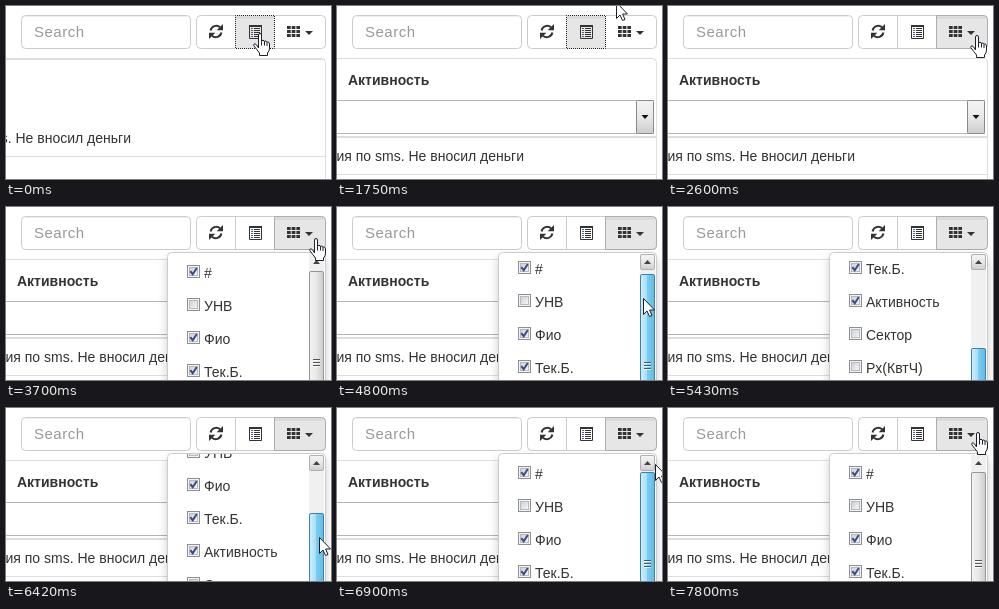
An HTML page for the animation above (8 s loop, 325 by 173 pixels).

```html
<!DOCTYPE html>
<html lang="ru">
<head>
<meta charset="utf-8">
<title>Column picker</title>
<style>
html, body { margin: 0; width: 100%; height: 100%; overflow: hidden; background: #fff; }
svg { display: block; width: 325px; height: 173px; }
text { font: 14px "Liberation Sans", Arial, sans-serif; fill: #333; white-space: pre; }
.hint { font-size: 15px; letter-spacing: .5px; fill: #999; }
.bold { font-weight: bold; }
.end { text-anchor: end; }
.box { fill: #fff; stroke: #ccc; }
.line { fill: none; stroke: #ddd; }
.ink { fill: #333; }
.on { fill: #e6e6e6; stroke: #adadad; }
.menu { filter: drop-shadow(0 5px 5px rgba(0, 0, 0, .2)); }
.cursor { fill: #fff; stroke: #1c1f2a; stroke-linejoin: round; }
</style>
</head>
<body>
<svg viewBox="0 0 325 173">
  <defs>
    <linearGradient id="grey"><stop stop-color="#f4f4f4"/><stop offset=".5" stop-color="#e6e6e6"/><stop offset="1" stop-color="#cbcbcb"/></linearGradient>
    <linearGradient id="blue"><stop stop-color="#d3effc"/><stop offset=".45" stop-color="#a6def6"/><stop offset=".5" stop-color="#79cdf0"/><stop offset="1" stop-color="#62bce6"/></linearGradient>
    <linearGradient id="knob" x2="0" y2="1"><stop stop-color="#f4f4f4"/><stop offset=".5" stop-color="#e8e8e8"/><stop offset="1" stop-color="#cdcdcd"/></linearGradient>
    <linearGradient id="tick" x2="1" y2="1"><stop stop-color="#cbcfd5"/><stop offset="1" stop-color="#f7f7f7"/></linearGradient>
    <clipPath id="list"><path d="M162 46h157v140h-157z"/></clipPath>
  </defs>

  <rect class="box" x="15.5" y="9.5" width="169" height="33" rx="4"/>
  <path d="M18 10.5h164" stroke="#eee"/>
  <text class="hint" x="28" y="31">Search</text>

  <rect class="line" x="-9.5" y="52.5" width="329" height="200" rx="4"/>
  <g id="card">
    <path class="line" d="M0 53.5h319M0 150.5h319"/>
    <text class="end" x="125" y="137">sms. Не вносил деньги</text>
  </g>
  <g id="table">
    <text class="bold" x="11" y="79">Активность</text>
    <path d="M0 94.5H316.5V127.5H0" fill="none" stroke="#b4b4b4"/>
    <rect x="299.5" y="94.5" width="17" height="33" rx="1" fill="url(#knob)" stroke="#8a8a8a"/>
    <path d="M304.5 109h7l-3.5 4z" fill="#111"/>
    <path class="line" d="M0 131h319" stroke-width="2"/>
    <path class="line" d="M0 168.5h319"/>
    <text class="end" x="187" y="155">ия по sms. Не вносил деньги</text>
  </g>

  <rect class="box" x="190.5" y="9.5" width="129" height="33" rx="4"/>
  <path d="M229.5 10v32M268.5 10v32" stroke="#ccc"/>
  <g id="view">
    <path d="M229 9h40v34h-40z" fill="#e6e6e6"/>
    <path d="M230 11.5h38" stroke="#d6d6d6" stroke-width="2"/>
    <path d="M229.5 9.5h39v33h-39z" fill="none" stroke="#222" stroke-dasharray="1" stroke-dashoffset=".5"/>
  </g>
  <path id="hover" class="on" d="M268.5 9.5h47q4 0 4 4v25q0 4-4 4h-47z"/>
  <path id="inset" d="M269 11.5h48" stroke="#d6d6d6" stroke-width="2"/>

  <path d="M204.6 24.5A5.7 5.7 0 0 1 214 21.3M215.4 26.5A5.7 5.7 0 0 1 206 29.7" fill="none" stroke="#333" stroke-width="2"/>
  <path class="ink" d="M217 18v6.3h-6.3zM203 33v-6.3h6.3z"/>
  <path d="M243.5 19.5h12v13h-12z" fill="none" stroke="#333"/>
  <path d="M243 20h13" stroke="#333" stroke-width="2"/>
  <path d="M245 22.5h2M245 24.5h2M245 26.5h2M245 28.5h2M245 30.5h2" stroke="#4a6488"/>
  <path d="M248 22.5h6M248 24.5h6M248 26.5h6M248 28.5h6M248 30.5h6" stroke="#333"/>
  <path d="M281 21.5h13M281 25.5h13M281 29.5h13" stroke="#333" stroke-width="3" stroke-dasharray="3.7 1"/>
  <path class="ink" d="M299 25h8l-4 4z"/>

  <g id="menu">
    <rect class="box menu" x="161.5" y="45.5" width="158" height="160" rx="4"/>
    <g clip-path="url(#list)"><g id="items"></g></g>
    <path d="M303 47h15v126h-15z" fill="#f0f0f0"/>
    <rect id="up" x="303.5" y="47.5" width="14" height="15" rx="1.5" fill="url(#knob)" stroke="#b0b0b0"/>
    <path d="M307 57h7l-3.5-4z" fill="#444"/>
    <g id="thumb">
      <rect x="303.5" y="64.5" width="14" height="181" rx="1.5"/>
      <path d="M307 152.5h7M307 155.5h7M307 158.5h7" stroke="#555"/>
      <path d="M307 153.5h7M307 156.5h7M307 159.5h7" stroke="#fff" opacity=".7"/>
    </g>
  </g>

  <g id="hand" class="cursor">
    <path d="M5.5 15V2Q5.5.5 7 .5T8.5 2V8.5Q8.5 7.3 10 7.3T11.5 9Q11.5 8 12.7 8T14 9.7Q14 8.8 15.2 9T16.5 11V15Q16.5 18 14.5 20V22.5H6.5V20Q4 17 .8 12.5Q.5 10.8 2 10.8Q3.5 11 5.5 15Z"/>
    <path d="M8.5 8.5v4M11.5 9v3.5M14 10v3"/>
  </g>
  <path id="arrow" class="cursor" d="M.5.5V16.5L4 13L6.5 18.5L9 17.5L6.6 12H11.5Z"/>
</svg>
<script>
const $ = id => document.getElementById(id);
const show = (id, on) => $(id).style.display = on ? '' : 'none';
const move = (id, x, y) => $(id).setAttribute('transform', `translate(${x} ${y})`);

const columns = [['#', 1], ['УНВ', 0], ['Фио', 1], ['Тек.Б.', 1], ['Активность', 1], ['Сектор', 0], ['Рх(КвтЧ)', 0]];
$('items').innerHTML = columns.map(([name, checked], i) => `
  <g transform="translate(181 ${58 + 33 * i})">
    <rect x=".5" y=".5" width="12" height="12" fill="#f4f4f4" stroke="#8e8f8f"/>
    <rect x="2.5" y="2.5" width="8" height="8" fill="url(#tick)" stroke="#b5bac2"/>
    ${checked ? '<path d="M3.3 6.2l2.4 3L9.8 3" fill="none" stroke="#3a4a8c" stroke-width="2"/>' : ''}
    <text x="17" y="13">${name}</text>
  </g>`).join('');

// Pointer hotspot: time, x, y
const path = [
  [0, 253, 27], [570, 253, 27], [630, 252, 28], [1450, 252, 28], [1750, 279, -4],
  [2220, 308, 28], [2280, 308, 29], [3640, 308, 29], [3700, 309, 31], [4250, 306, 88],
  [4500, 306, 88], [4800, 306, 90.6], [5250, 307, 161], [5430, 308, 178], [6120, 308, 178],
  [6180, 310, 165], [6900, 318, 56], [7210, 318, 56], [7330, 319, 55], [7510, 319, 55],
  [7800, 309, 24], [8000, 309, 24]
];

function pointer(t) {
  const i = path.findIndex(k => k[0] > t);
  const [a, b] = [path[i - 1], path[i]];
  const p = (t - a[0]) / (b[0] - a[0]);
  return [1, 2].map(n => a[n] + (b[n] - a[n]) * p);
}

function draw() {
  const t = performance.now() % 8000;
  const [x, y] = pointer(t);
  const overButton = y > 9 && y < 44;
  const overBar = y > 46 && t < 7210;
  const blue = overBar && (y >= 65 || t > 4500);
  const drag = t > 4500 && t < 7210 ? Math.max(0, Math.min(77, y - 88)) : 0;

  show('card', t < 1060);
  show('table', t >= 1060);
  show('view', t < 2600);
  show('hover', t >= 2600 || (t > 1750 && overButton));
  show('inset', t >= 2600);
  show('menu', t >= 2650);
  show('up', overBar);

  move('items', 0, -Math.round(drag * 1.34));
  move('thumb', 0, Math.round(drag));
  const bar = $('thumb').firstElementChild;
  bar.setAttribute('fill', blue ? 'url(#blue)' : 'url(#grey)');
  bar.setAttribute('stroke', blue ? '#3c7fb1' : '#979797');

  show('hand', overButton);
  show('arrow', !overButton);
  move('hand', Math.round(x) - 6, Math.round(y));
  move('arrow', Math.round(x), Math.round(y));
  requestAnimationFrame(draw);
}
draw();
</script>
</body>
</html>
```
